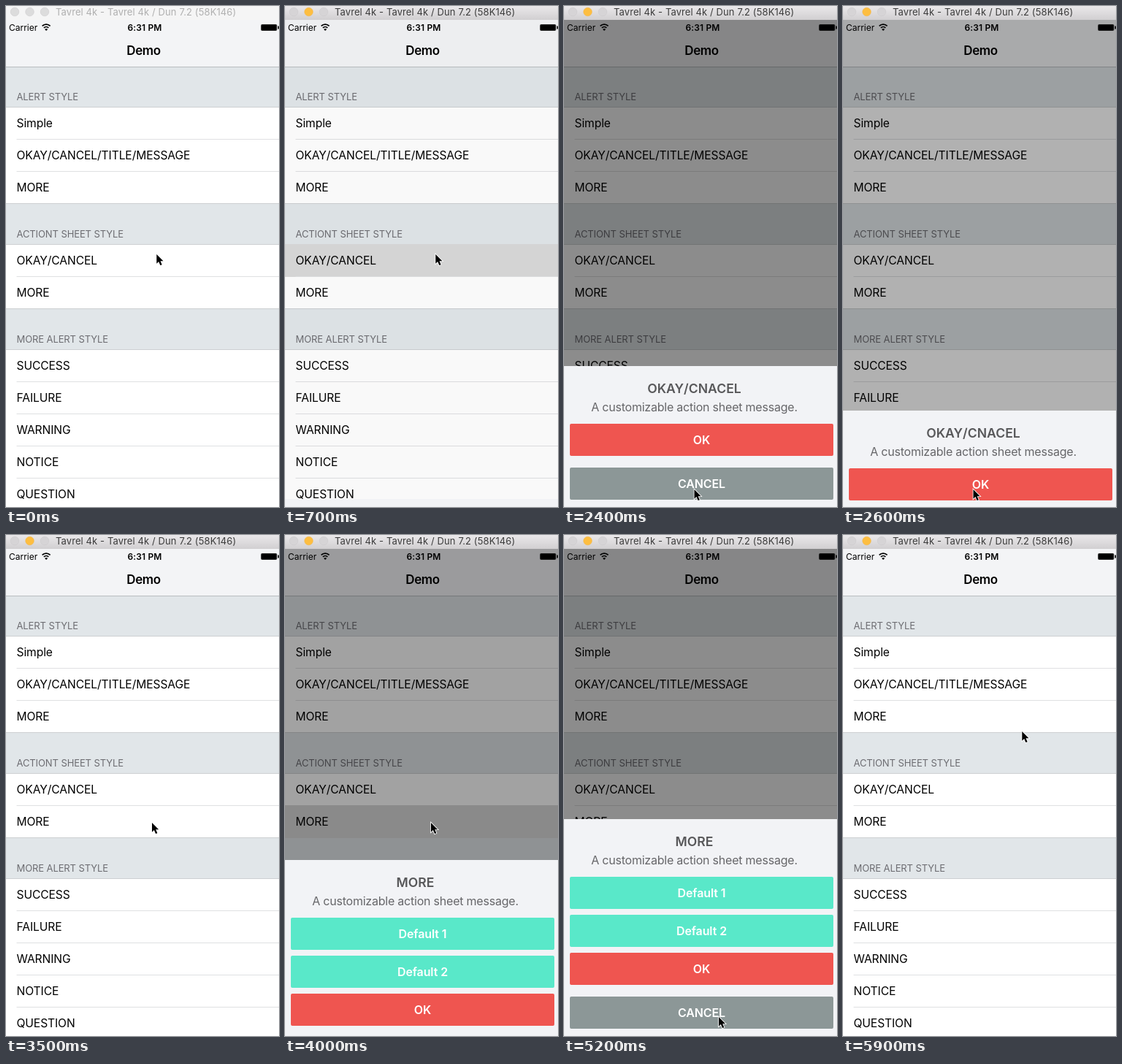
Write an HTML page that moves like this. It is 374 px wide and 686 px high and loops after 6 s.

```html
<!DOCTYPE html>
<html lang="en">
<head>
<meta charset="utf-8">
<style>
  html, body { margin: 0; width: 100%; height: 100%; overflow: hidden; }
  svg { display: block; width: 374px; height: 686px; font-family: Inter, sans-serif; }
  .header { font-size: 13px; letter-spacing: -.1px; fill: #6d6d72; }
  .row { font-size: 15.6px; letter-spacing: -.08px; }
  .nav { font-size: 17px; font-weight: 600; letter-spacing: -.4px; text-anchor: middle; }
  .status { font-size: 12px; }
  .time { font-size: 12px; font-weight: 600; letter-spacing: .15px; text-anchor: middle; }
  .caption { font-size: 13px; letter-spacing: .1px; }
  .title { font-size: 17.6px; font-weight: 600; fill: #58585a; text-anchor: middle; }
  .message { font-size: 16px; letter-spacing: -.22px; fill: #666669; text-anchor: middle; }
  .button { font-size: 16px; font-weight: 600; letter-spacing: -.1px; fill: #fff; text-anchor: middle; }
</style>
</head>
<body>
<svg id="stage" viewBox="0 0 374 686">
  <defs>
    <linearGradient id="chrome" x2="0" y2="1">
      <stop stop-color="#eae8ea"/><stop offset="1" stop-color="#d1cfd1"/>
    </linearGradient>
  </defs>
  <rect width="374" height="686" fill="#e1e6e9"/>
  <g id="list"></g>
  <rect y="18" width="374" height="65" fill="#f3f4f6"/>
  <rect y="83" width="374" height="1" fill="#b9bdc0"/>
  <g id="bar">
    <path d="M49.6 27.4a7.8 7.8 0 0 1 11 0M51.9 29.9a4.6 4.6 0 0 1 6.4 0" fill="none" stroke="#000" stroke-width="1.7"/>
    <path d="M55.1 34l-2-2.1a2.9 2.9 0 0 1 4 0Z"/>
    <rect x="349" y="25" width="22.5" height="9" rx="2" fill="#555"/>
    <rect x="350" y="25.5" width="20.5" height="8" rx="1"/>
    <rect x="372.5" y="27.5" width="1.5" height="4"/>
  </g>
  <rect id="shade" y="18" width="374" height="668"/>
  <g id="sheets"></g>
  <g id="window"></g>
  <path id="cursor" d="M0 0V14.2l3.2-3 2.4 5.6 2.6-1.1-2.4-5.4H10.2Z" stroke="#fff" stroke-width="1.8" paint-order="stroke"/>
</svg>
<script>
const LOOP = 6000, STEP = 100, DIM = 0.45, BOTTOM = 686;
const $ = id => document.getElementById(id);

function add(parent, tag, attrs, text = '') {
  const el = document.createElementNS('http://www.w3.org/2000/svg', tag);
  for (const key in attrs) el.setAttribute(key, attrs[key]);
  el.textContent = text;
  return parent.appendChild(el);
}
const rect = (parent, x, y, width, height, fill, rx = 0) =>
  add(parent, 'rect', { x, y, width, height, fill, rx });
const label = (parent, cls, x, y, text) => add(parent, 'text', { class: cls, x, y }, text);

const sections = [
  [138, 'ALERT STYLE', ['Simple', 'OKAY/CANCEL/TITLE/MESSAGE', 'MORE']],
  [326, 'ACTIONT SHEET STYLE', ['OKAY/CANCEL', 'MORE']],
  [470, 'MORE ALERT STYLE', ['SUCCESS', 'FAILURE', 'WARNING', 'NOTICE', 'QUESTION']]
];
const highlights = {};
for (const [top, name, items] of sections) {
  const list = $('list'), height = items.length * 44;
  label(list, 'header', 14.5, top - 9.5, name);
  rect(list, 0, top, 374, height + 1, '#cdd0d2');
  rect(list, 0, top + 1, 374, height - 1, '#fff');
  items.forEach((item, i) => {
    const y = top + i * 44;
    if (i) rect(list, 14.5, y, 360, 1, '#dfe0e2');
    highlights[y] = rect(list, 0, y, 374, 45, '#d9d9d9');
    highlights[y].setAttribute('opacity', 0);
    label(list, 'row', 14.5, y + 27.7, item);
  });
}

label($('bar'), 'status', 4, 33.5, 'Carrier');
label($('bar'), 'time', 190, 33.5, '6:31 PM');
label($('bar'), 'nav', 188.5, 67.2, 'Demo');

const MINT = '#59e8c9', RED = '#ef5550', GRAY = '#8c9797';

function makeSheet(title, buttons) {
  const g = add($('sheets'), 'g', {});
  const height = 141 + buttons.length * 52;
  rect(g, 0, 0, 374, height, '#f2f3f6');
  label(g, 'title', 178.5, 37.3, title);
  label(g, 'message', 178.5, 61.7, 'A customizable action sheet message.');
  [...buttons, ['CANCEL', GRAY]].forEach(([text, color], i) => {
    const y = 79 + i * 52 + (i === buttons.length ? 8 : 0);
    rect(g, 8, y, 361, 44, color, 2);
    label(g, 'button', 188.5, y + 27.8, text);
  });
  return { g, height };
}

const sheets = [
  { ...makeSheet('OKAY/CNACEL', [['OK', RED]]),
    open: 650, close: 2480, row: highlights[326], press: [500, 1000] },
  { ...makeSheet('MORE', [['Default 1', MINT], ['Default 2', MINT], ['OK', RED]]),
    open: 3750, close: 5270, row: highlights[370], press: [3650, 4250] }
];

const chrome = rect($('window'), 0, 0, 374, 19);
const lights = [12, 32.5, 53].map(cx =>
  add($('window'), 'circle', { cx, cy: 8, r: 5.8, 'stroke-width': .5 }));
const caption = label($('window'), 'caption', 68, 13, 'Tavrel 4k - Tavrel 4k / Dun 7.2 (58K146)');

// Pointer moves: start, end, x, y
const moves = [
  [0, 0, 206.3, 340],
  [1450, 2100, 178.5, 662],
  [2750, 3400, 200, 394],
  [4250, 4900, 212, 660],
  [5540, 5900, 245.3, 269]
];

function ease(t, start, end) {
  const k = Math.min(1, Math.max(0, (t - start) / (end - start)));
  return k * k * (3 - 2 * k);
}

function draw(t) {
  let shade = 0;
  for (const s of sheets) {
    const shown = ease(t, s.open, s.open + 346) - ease(t, s.close, s.close + 320);
    s.g.setAttribute('transform', `translate(0 ${Math.round(BOTTOM - s.height * shown)})`);
    s.row.setAttribute('opacity', t >= s.press[0] && t < s.press[1] ? 1 : 0);
    shade += shown;
  }
  $('shade').setAttribute('opacity', shade * DIM);

  const active = t >= 200;
  chrome.setAttribute('fill', active ? 'url(#chrome)' : '#f5f5f5');
  caption.setAttribute('fill', active ? '#3c3c3c' : '#b0b0b0');
  lights.forEach((dot, i) => {
    const yellow = active && i === 1;
    dot.setAttribute('fill', yellow ? '#fdbe41' : active ? '#d6d4d6' : '#dcdcdc');
    dot.setAttribute('stroke', yellow ? '#f0b040' : '#c8c6c8');
  });

  let [, , x, y] = moves[0];
  for (const [start, end, toX, toY] of moves.slice(1)) {
    const k = ease(t, start, end);
    x += (toX - x) * k;
    y += (toY - y) * k;
  }
  $('cursor').setAttribute('transform', `translate(${x} ${y}) scale(.9)`);
}

function tick() {
  draw(Math.floor(performance.now() % LOOP / STEP) * STEP);
  requestAnimationFrame(tick);
}
tick();
</script>
</body>
</html>
```
